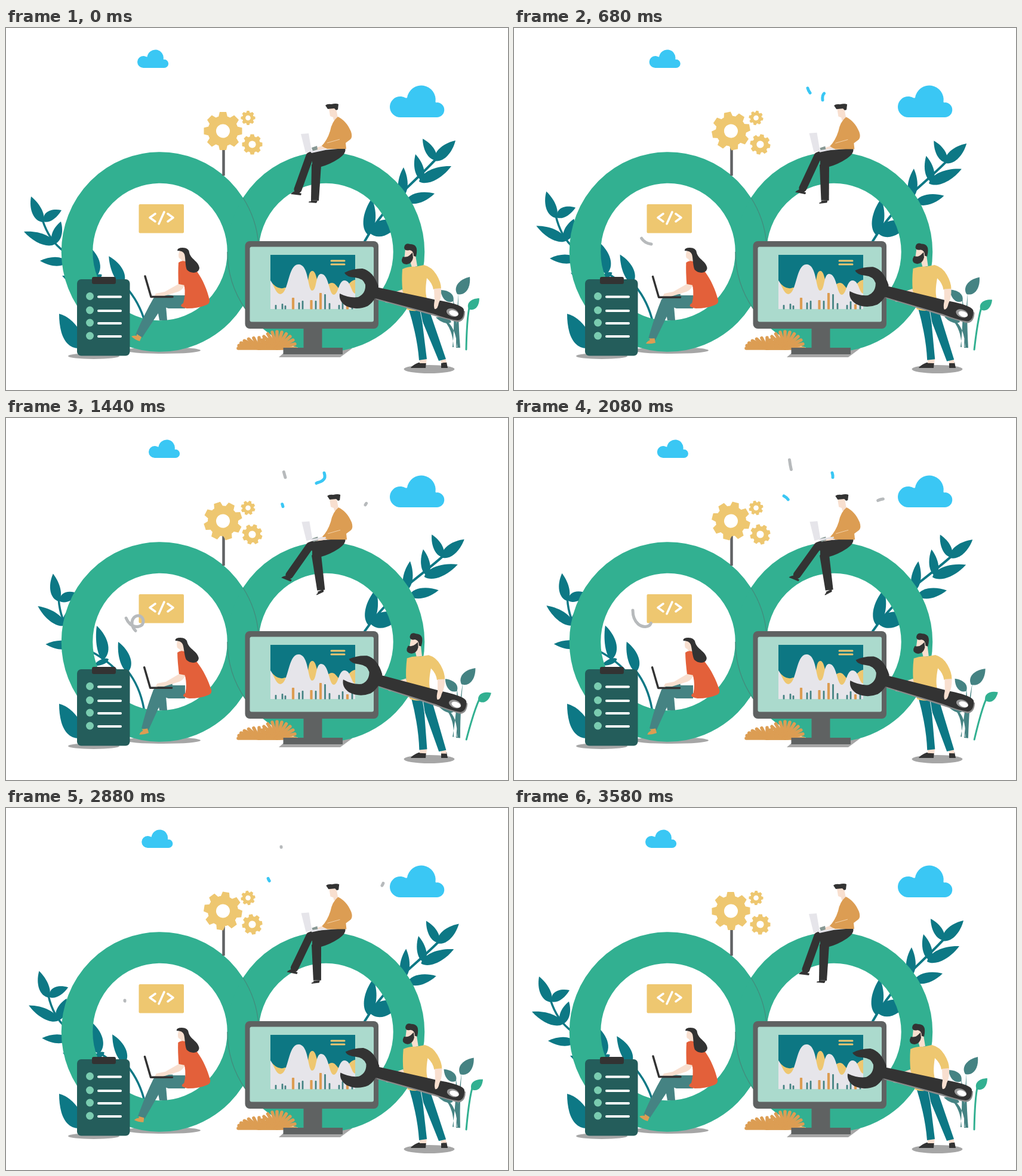
An HTML page for the animation above (3600 ms loop, 841 px wide and 608 px high).

```html
<!DOCTYPE html>
<html lang="en">
<head>
<meta charset="utf-8">
<title>DevOps loop</title>
<style>
html, body { margin: 0; width: 100%; height: 100%; overflow: hidden; background: #fff; }
svg { display: block; }
.teal { fill: #0d7885; } .green { fill: #32b091; } .sage { fill: #458383; }
.gold { fill: #eec770; } .tan { fill: #dc9d53; } .ink { fill: #333; }
.skin { fill: #f8dfcf; } .sky { fill: #3ac7f4; } .pale { fill: #e6e5ea; }
.shade { fill: #a6a6a6; } .steel { fill: #5f6262; }
.line { fill: none; stroke-linecap: round; stroke-linejoin: round; }
</style>
</head>
<body>
<svg width="841" height="608" viewBox="0 0 841 608">
<defs>
  <path id="cloud" class="sky" d="M660.500 115C667 115 670 119 672 117A24 24 0 0 1 719.500 124Q720 126 722 125A12.500 12.500 0 0 1 721.500 150H660.500A17.500 17.500 0 0 1 660.500 115Z"/>
  <g id="gear">
    <circle r="25.500" class="gold"/>
    <g id="teeth" class="gold"></g>
    <circle r="11.500" fill="#fff"/>
  </g>
</defs>

<g id="smallCloud"><use href="#cloud" transform="translate(-147.400 -18.700) scale(.5714)"/></g>
<use href="#cloud"/>

<!-- foliage behind the rings -->
<g id="leftBranch" class="teal">
  <path class="line" stroke="#0d7885" stroke-width="3.500" d="M61 322Q72 357 97 375T150 425"/>
  <g id="lowLeaf"></g>
</g>
<g id="innerPlant" class="teal">
  <path class="line" stroke="#0d7885" stroke-width="3.500" d="M231 488Q224 450 203 424M203 446Q180 411 140 391"/>
</g>
<g id="rightBranch" class="teal">
  <path class="line" stroke="#0d7885" stroke-width="4" d="M601 358Q628 310 672 268T721 219"/>
</g>
<path class="teal" d="M89 480C89 515 100 538 122 538V506Q108 485 89 480Z"/>

<ellipse class="shade" cx="263" cy="541.500" rx="63" ry="5.500"/>
<ellipse class="shade" cx="147" cy="551" rx="43" ry="5"/>
<path class="shade" d="M457 553H560L580 538H474Z"/>
<ellipse class="shade" cx="709" cy="573" rx="42.500" ry="7"/>

<g fill="none" stroke="#32b091" stroke-width="52.500">
  <ellipse cx="258" cy="376" rx="139" ry="141.500"/>
  <ellipse cx="536" cy="376" rx="139" ry="141.500"/>
</g>
<path fill="none" stroke="#438b7c" stroke-width="1.300" d="M397 285A165 168 0 0 1 423 362M371 376A165 168 0 0 0 401 472"/>

<!-- gears -->
<path stroke="#606264" stroke-width="4.500" d="M364.500 195V248"/>
<g id="gearA"><use href="#gear"/></g>
<g id="gearB"><use href="#gear"/></g>
<g id="gearC"><use href="#gear"/></g>

<!-- code sign -->
<rect class="gold" x="222.500" y="296" width="75.500" height="48.500" rx="2"/>
<path class="line" stroke="#fff" stroke-width="3.500" d="M250 312L241 318.500L250 325M265 309L256 329M271 312L280 318.500L271 325"/>

<!-- seated woman -->
<path class="sage" d="M262 462L254 474L257 491H270L268 468Z"/>
<g id="calf">
  <path class="sage" d="M247 454Q256 446 280 449L277 469Q262 466 257 476L228 520L217 515Q232 480 247 454Z"/>
  <g id="foot"><path class="tan" d="M219 514L227 519L224 526Q215 523 210 518Q214 516 219 517Z"/></g>
</g>
<path class="sage" d="M262 449H300V471L272 471Q260 468 262 449Z"/>
<g id="woman">
  <path class="skin" d="M290 376Q287 387 293 388L296 394L303 393L302 378L294 372Z"/>
  <path d="M289 394Q295 389 303 393L320 409C330 423 337 440 341 457Q342 462 336 465Q322 471 303 471Q287 468 297 462Q301 448 299 434L289 432Q288 408 289 394Z" fill="#e3603a"/>
  <path class="skin" d="M289 430L299 432Q296 440 288 443L262 451H248L251 446L266 443Z"/>
  <path class="ink" d="M287 374Q287 369 296 369Q306 369 307 377C309 388 323 392 324 403C323 413 309 413 303 406C300 399 301 387 299 380Q297 374 287 374Z"/>
</g>
<g id="notebook"><path class="line" stroke="#333" stroke-width="3.500" d="M233 417L243 451.500H279"/></g>

<!-- clipboard -->
<rect x="119" y="422" width="88.500" height="128.500" rx="7" fill="#245d5b"/>
<rect class="ink" x="144" y="418" width="40" height="12" rx="3"/>
<g id="tasks"></g>

<!-- grass -->
<g id="grass" class="line" stroke="#dc9d53" stroke-width="5.500"></g>

<!-- monitor -->
<path class="steel" d="M498.500 500H529.500V537H564V548H464.500V537H498.500Z"/>
<rect class="steel" x="400.500" y="358" width="223.500" height="147" rx="8"/>
<rect x="408.500" y="367.500" width="207.500" height="126" rx="3" fill="#abdacd"/>
<rect x="443" y="381" width="142" height="91" fill="#0d7783"/>
<path class="gold" d="M443 425Q455 441 467 436L500 440C508 440 504 408 513 408C522 408 520 437 530 437C538 437 538 428 546 428C553 428 555 438 560 438C572 438 575 424 585 423V472H443Z"/>
<path class="pale" d="M443 472V424C449 432 452 447 460 447C474 445 472 397 490 397C508 397 505 441 513 441C521 441 518 413 528 413C541 413 541 448 549 448C557 448 557 424 567 424C578 424 578 445 585 446V472Z"/>
<g id="bars"></g>
<path class="line" stroke="#eec770" stroke-width="3" d="M545 391H567M545 397H567"/>

<!-- man on the ring -->
<g id="shinA">
  <path class="line" stroke="#333" stroke-width="13" d="M509 215L489 271"/>
  <path class="ink" d="M483 274L495 278L494 281L477 279Q478 277 483 274Z"/>
</g>
<g id="shinB">
  <path class="ink" d="M512 229L528 230L524 290L511 289Z"/>
  <g id="shoeB"><path class="ink" d="M511 289L522 290L520 294L507 293Q507 291 511 291Z"/></g>
</g>
<path class="ink" d="M503 214Q504 207 520 206L568 202Q571 210 558 219Q543 229 528 233H513V223L506 220Z"/>
<g id="sitter">
  <path class="skin" d="M541 135H553L556 151L549 155L548 150L543 148Z"/>
  <path class="tan" d="M556 149C565 153 573 162 578 174Q581 183 577 187L569 193L570 203H538L528 199Q538 189 543 173Q546 157 556 149Z"/>
  <path class="skin" d="M529 198L536 203L516 206L514 203Z"/>
  <path d="M512 201L521 198L522 204L514 207Z" fill="#879894"/>
  <path d="M538 193L559 187" stroke="#f3d3ab"/>
</g>
<g id="sitterHead"><path class="ink" d="M535 130Q538 127 545 128Q553 126 557 128L556 137L553 138L550 135L539 136Z"/></g>
<g id="laptop">
  <path class="pale" d="M494 178L507 177L512 207L502 210Z"/>
  <path class="pale" d="M509 207L534 203L535 205L512 210Z"/>
</g>

<!-- plants on the right -->
<g id="sagePlant" class="sage">
  <path d="M748 536H755Q757 490 749 454Q752 500 748 536ZM754 537H761Q757 490 758 444Q754 490 754 537ZM750 536Q748 502 730 488Q753 496 756 536Z"/>
</g>
<g id="sprout" class="green">
  <path class="line" stroke="#32b091" stroke-width="3" d="M771 540Q772 490 776 470"/>
</g>

<!-- man with the wrench -->
<path class="ink" d="M691 562L704 561L703 571H678Q681 566 691 562ZM729 563L738 561L740 571H729Z"/>
<g id="mechanic">
  <path class="skin" d="M693 555L705 554L704 563H693ZM727 555L736 554L738 562H729Z"/>
  <path class="teal" d="M674 470L707 468L737 556L725 559L697 491L705 556L692 558Q689 518 674 470Z"/>
  <path d="M694 475L698 495" stroke="#e9f2f2"/>
  <path class="skin" d="M669 371L684 370L689 400L680 402L677 392L667 390Z"/>
  <path class="ink" d="M667 369Q668 360 677 363Q690 363 688 378L687 384L683 383Q683 374 676 373Q668 375 667 369Z"/>
  <path class="ink" d="M665 384Q672 386 677 381L681 377L682 386Q680 396 671 397Q662 396 663 389Z"/>
  <path class="gold" d="M664 405Q675 400 686 401L700 398Q713 401 721 414Q729 427 729 438L716 439Q714 428 705 420Q701 445 706 457L704 472Q684 478 672 473Q661 445 664 405Z"/>
  <path class="skin" d="M664 439L640 448Q631 453 636 461L646 462L667 451Z"/>
  <path d="M620 456L716 483Q744 491 757 494Q769 493 769 476L760 470L620 440Z" fill="#8a8a8a"/>
  <path class="ink" d="M615 434L722 457Q765 464 767 473Q768 490 757 491Q740 489 716 480L615 453Z"/>
  <path class="ink" d="M567 411Q580 404 597 404Q615 408 624 434Q622 456 606 467Q588 475 570 467Q557 459 559 446Q575 454 590 452Q603 446 602 431Q598 420 584 419Q570 418 567 411Z"/>
  <ellipse cx="748" cy="478" rx="10.500" ry="6.500" fill="#999" transform="rotate(18 748 478)"/>
  <ellipse cx="750" cy="479" rx="8" ry="4.500" fill="#fff" transform="rotate(18 750 479)"/>
  <path class="skin" d="M717 438L729 437Q730 452 725 462Q723 473 718 472Q716 467 718 458Z"/>
</g>

<g id="squiggles" class="line" stroke-width="5"></g>
</svg>

<script>
const LOOP = 3600;
const $ = id => document.getElementById(id);
const add = (id, markup) => $(id).insertAdjacentHTML('beforeend', markup);

// A leaf from base to tip, fullest near the base; bend pushes its belly sideways.
function leaf(x0, y0, x1, y1, width, bend = 0) {
  const dx = x1 - x0, dy = y1 - y0, len = Math.hypot(dx, dy);
  const at = (along, side) => `${x0 + dx * along - dy / len * side} ${y0 + dy * along + dx / len * side}`;
  const a = bend + width / 1.5, b = bend - width / 1.5;
  return `<path d="M${x0} ${y0}C${at(.15, a)} ${at(.6, a)} ${x1} ${y1}C${at(.6, b)} ${at(.15, b)} ${x0} ${y0}Z"/>`;
}
const addLeaves = (id, list) => add(id, list.map(l => leaf(...l)).join(''));

addLeaves('leftBranch', [
  [62, 326, 42, 283, 17, -2], [63, 325, 93, 306, 16, -3], [82, 363, 30, 342, 17], [80, 363, 92, 325, 16],
  [135, 435, 94, 416, 14]
]);
addLeaves('lowLeaf', [[102, 393, 57, 391, 15]]);
addLeaves('innerPlant', [[162, 407, 152, 349, 19, 5], [204, 427, 188, 376, 18, 3], [172, 405, 146, 416, 9]]);
addLeaves('rightBranch', [
  [718, 223, 753, 189, 18], [720, 222, 698, 186, 15], [692, 258, 746, 232, 19], [697, 256, 686, 212, 15],
  [664, 284, 666, 234, 16], [670, 291, 718, 278, 17], [606, 347, 613, 286, 20], [609, 344, 661, 325, 26]
]);
addLeaves('sagePlant', [[756, 447, 777, 418, 19], [749, 459, 728, 440, 15], [746, 494, 720, 486, 9]]);
addLeaves('sprout', [[775, 472, 793, 454, 15]]);

for (let i = 0; i < 8; i++)
  add('teeth', `<path d="M-8 -22L-5.500 -32H5.500L8 -22Z" transform="rotate(${i * 45})"/>`);

for (const y of [451, 474.5, 495.5, 517.5])
  add('tasks', `<circle cx="140.500" cy="${y - .5}" r="6.500" fill="#7accb0"/>
    <path class="line" stroke="#fff" stroke-width="4" d="M155 ${y + .5}H192"/>`);

function fan(cx, rx, ry, n) {
  for (let i = 0; i <= n; i++) {
    const a = Math.PI * i / n;
    add('grass', `<path d="M${cx} 538L${cx - rx * Math.cos(a)} ${538 - ry * Math.sin(a)}"/>`);
  }
}
fan(424, 35, 18, 12);
fan(454, 31, 28, 12);

const bar = (color, w) => ([x, y]) =>
  add('bars', `<rect x="${x - w / 2}" y="${y}" width="${w}" height="${472.5 - y}" rx="1" fill="${color}"/>`);
[[452, 465], [463, 463], [468, 466], [491, 461], [497, 458], [519, 458], [534.5, 447], [542, 462], [558, 465], [564, 459], [580, 459]]
  .forEach(bar('#458383', 2.8));
[[481, 453], [511.500, 457], [527, 445], [572, 464]].forEach(bar('#dc9d53', 4.2));

// path, colour, head start/end and tail start/end in ms
const GREY = '#b7babc', BLUE = '#3ac7f4';
const squiggles = [
  ['M230 363C218 361 212 354 211 345C211 329 229 328 230 341C230 352 216 353 208 346Q199 338 199 323', GREY, 300, 1750, 1000, 3000],
  ['M517 121C516 112 519 109 524 108C536 104 535 98 533 92', BLUE, 200, 1500, 700, 2650],
  ['M496 109Q493 105 492 101', BLUE, 250, 680, 680, 1150],
  ['M468 100C465 90 462 78 461 65', GREY, 900, 2450, 1350, 3050],
  ['M602 146Q606 138 618 136T632 126', GREY, 1100, 3000, 1400, 3300],
  ['M464 149C460 133 455 133 447 128Q441 124 439 118', BLUE, 1050, 3000, 1350, 3300]
].map(([d, color, ...times]) => {
  add('squiggles', `<path d="${d}" stroke="${color}" pathLength="1"/>`);
  return { path: $('squiggles').lastElementChild, times };
});

// Eased 0 to 1 between two times.
function smooth(t, from, to) {
  const x = Math.min(1, Math.max(0, (t - from) / (to - from)));
  return x * x * (3 - 2 * x);
}
// Cosine swing from 0 up to 1 at the peak time and back.
const swing = (t, peak = LOOP / 2) =>
  (1 - Math.cos(Math.PI * (t < peak ? t / peak : (LOOP - t) / (LOOP - peak)))) / 2;

const set = (id, transform) => $(id).setAttribute('transform', transform);
const turn = (id, angle, x, y) => set(id, `rotate(${angle} ${x} ${y})`);
const shift = (id, x, y) => set(id, `translate(${x} ${y})`);

function draw(t) {
  const s = swing(t), spin = 180 * t / LOOP;
  const kick = smooth(t, 0, 900) * (1 - smooth(t, 2100, 3500));

  shift('smallCloud', 21 * s, 0);
  turn('leftBranch', 15 * s, 151, 427);
  turn('lowLeaf', -15 * s, 100, 393);
  turn('innerPlant', 9.2 * s - 8.3, 230, 488);
  turn('rightBranch', 5.8 * s, 600, 357);
  turn('sagePlant', 6.2 * swing(t, 2200), 755, 537);
  turn('sprout', 14 * swing(t, 1600), 771, 541);

  set('gearA', `translate(363.500 173) rotate(${spin})`);
  set('gearB', `translate(405.500 151) rotate(${-spin}) scale(.375)`);
  set('gearC', `translate(412.500 195.500) rotate(${-spin}) scale(.53)`);

  turn('calf', -9 * kick, 262, 455);
  turn('foot', -30 * kick, 223, 518);
  set('woman', `translate(0 418) skewX(${5 * s}) translate(0 -418)`);
  shift('notebook', -1.5 * s, 2 * s);

  turn('shinA', 17 * s, 509, 215);
  turn('shinB', -11 * s, 520, 230);
  turn('shoeB', -22 * s, 518, 290);
  shift('sitter', 1.2 * s, 1.3 * s);
  shift('sitterHead', 3.5 * s, s);
  shift('laptop', 1.5 * s, -4 * s);

  turn('mechanic', 2.8 * swing(t, 1250), 700, 565);

  for (const { path, times: [h0, h1, t0, t1] } of squiggles) {
    const head = smooth(t, h0, h1), tail = smooth(t, t0, t1);
    path.style.display = head - tail > .002 ? '' : 'none';
    path.setAttribute('stroke-dasharray', `${head - tail} 9`);
    path.setAttribute('stroke-dashoffset', -tail);
  }
}

const start = performance.now();
function tick() {
  draw((performance.now() - start) % LOOP);
  requestAnimationFrame(tick);
}
tick();
</script>
</body>
</html>
```
